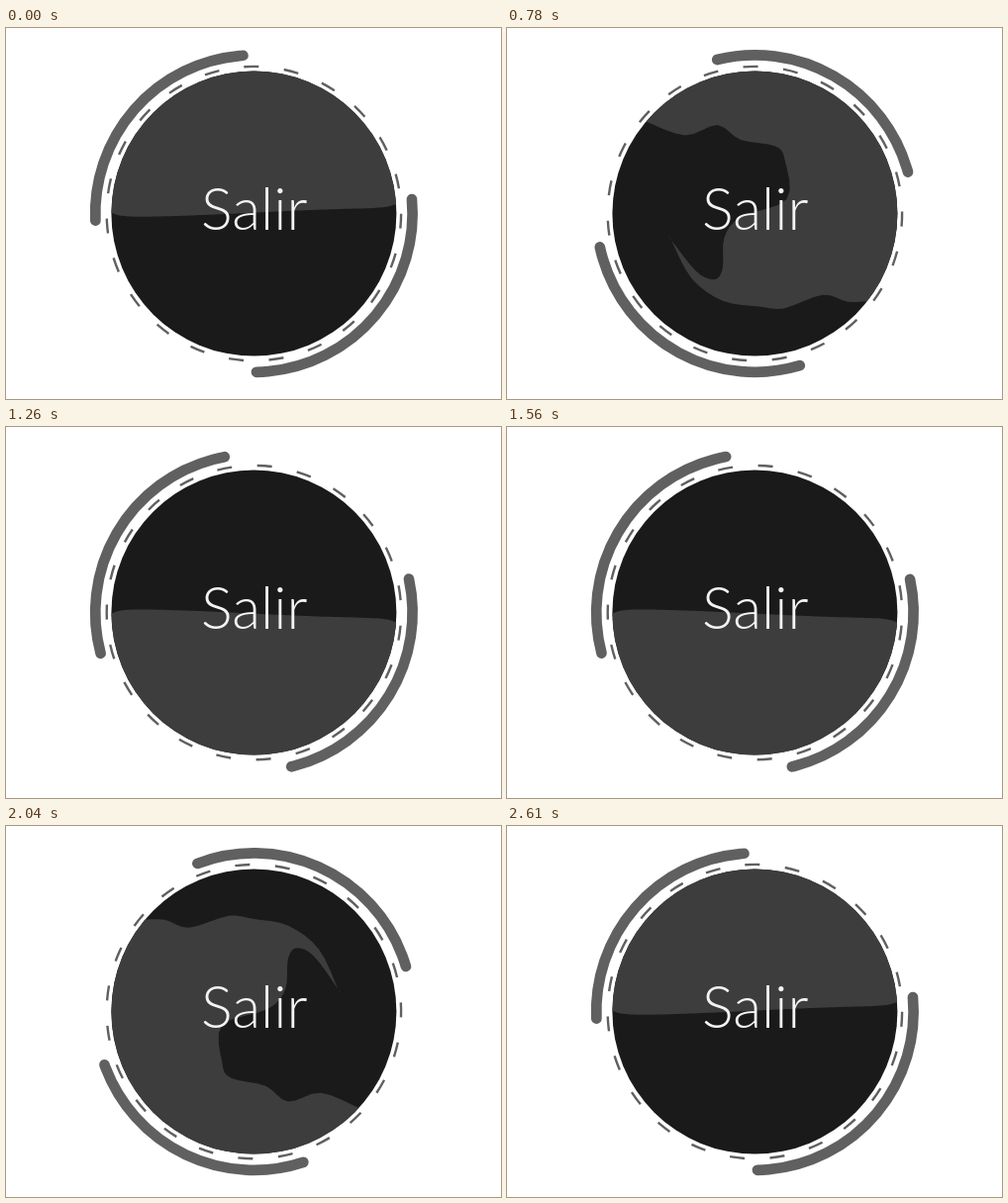
Recreate the animation shown at these times as an HTML page. Size 500x375 px, loop 2.64 s.

```html
<!DOCTYPE html>
<html lang="es">
<head>
<meta charset="utf-8">
<title>Salir</title>
<style>
  html, body { margin: 0; width: 100%; height: 100%; overflow: hidden; background: #fff; }
  svg { display: block; width: 100vw; height: 100vh; }
  .ring { fill: none; stroke: #606060; }
  text { font: 300 59.5px Lato, "Open Sans", sans-serif; fill: #f4f4f4; text-anchor: middle; }
</style>
</head>
<body>
<svg viewBox="0 0 500 375">
  <defs><clipPath id="disc"><circle r="144"/></clipPath></defs>
  <g transform="translate(250.4 187.6)">
    <circle id="arcs" class="ring" r="160.2" stroke-width="10.7" stroke-linecap="round"
      pathLength="360" stroke-dasharray="94.3 88.4 88.6 88.7"/>
    <circle id="dashes" class="ring" r="148.7" stroke-width="2.4"/>
    <circle r="144" fill="#1a1a1a"/>
    <g clip-path="url(#disc)"><path id="liquid" fill="#3d3d3d"/></g>
  </g>
  <text x="250.7" y="203.8">Salir</text>
</svg>
<script>
const LOOP = 2640, STEP = 30, R = 145, N = 80, DASHES = 23;
const SWINGS = [555, 1810], SWING = 435;
const $ = id => document.getElementById(id);
const arcs = $('arcs'), dashes = $('dashes'), liquid = $('liquid');

const pitch = 2 * Math.PI * 148.7 / DASHES;
dashes.setAttribute('stroke-dasharray', `${pitch * .37} ${pitch * .63}`);

const mix = (a, b, k) => a + (b - a) * k;
const clamp = k => Math.min(1, Math.max(0, k));
const sigmoid = (t, mid, rate) => 1 / (1 + Math.exp(-rate * (t - mid)));

function turn([x, y], deg) {
  const a = deg * Math.PI / 180, c = Math.cos(a), s = Math.sin(a);
  return [x * c - y * s, x * s + y * c];
}

// Catmull-Rom point at u in 0..1
function spline(pts, u) {
  const last = pts.length - 1, f = u * last, i = Math.min(Math.floor(f), last - 1), k = f - i;
  const at = j => pts[Math.min(last, Math.max(0, j))];
  return [0, 1].map(d => {
    const [a, b, c, e] = [at(i - 1)[d], at(i)[d], at(i + 1)[d], at(i + 2)[d]];
    return b + k / 2 * (c - a + k * (2 * a - 5 * b + 4 * c - e + k * (3 * (b - c) + e - a)));
  });
}

// Crest of the splash, from its trailing to its leading side
const crest = [
  [105, 97], [67, 82], [34, 91], [11, 75], [-24, 67], [-33, 52], [-33, 13], [14, -3],
  [32, -23], [35, -54], [44, -65], [62, -56], [86, -23], [86, -23], [67, -63],
  [36, -87], [0, -94], [-25, -97], [-65, -85], [-90, -93], [-113, -93]
].map(p => turn(p, -240));

// Nearly flat surface with the light liquid above it
const calm = (u, tilt) => -1 - tilt * 4.5 * Math.sin(u * Math.PI / 2) - 5 * u ** 16;
const ripple = (x, at, h) => h * Math.exp(-(((x - at) / 14) ** 2));

function liquidPath(t) {
  const half = t < LOOP / 2 ? 0 : 1;
  const since = t - SWINGS[half], k = clamp(since / SWING);
  const angle = 180 * (half + k ** 1.73);
  const tilt = (half ? -1 : 1) * mix(1, -1, k);
  const splash = Math.sin(Math.PI * k) ** 3;
  const height = mix(8, 3, k) * clamp(k * 10) * Math.exp(-Math.max(0, since - SWING) / 100);

  const line = Array.from({ length: N + 1 }, (_, i) => {
    const u = 2 * i / N - 1, x = u * R;
    const y = calm(u, tilt) + ripple(x, mix(98, -92, k), height);
    const c = spline(crest, i / N);
    return [mix(x, c[0], splash), mix(y, c[1], splash)];
  });
  const out = p => p.map(v => v * 1.3);
  const shape = [out(line[0]), ...line, out(line[N]), [400, -400], [-400, -400]];
  return 'M' + shape.map(p => turn(p, angle).map(v => v.toFixed(2)).join(' ')).join('L') + 'Z';
}

function draw(t) {
  const arc = -5.2 + 170.4 * sigmoid(t, 790, .0152) + 189.6 * sigmoid(t, 2050, .023);
  const dash = 52 * (sigmoid(t, 760, .0174) - sigmoid(t, 2049, .0146));
  arcs.setAttribute('transform', `rotate(${arc})`);
  dashes.setAttribute('transform', `rotate(${dash - 93.9})`);
  liquid.setAttribute('d', liquidPath(t));
}

const start = performance.now();
function tick() {
  const t = Math.max(0, performance.now() - start) % LOOP;
  draw(Math.floor(t / STEP) * STEP);
  requestAnimationFrame(tick);
}
tick();
</script>
</body>
</html>
```
